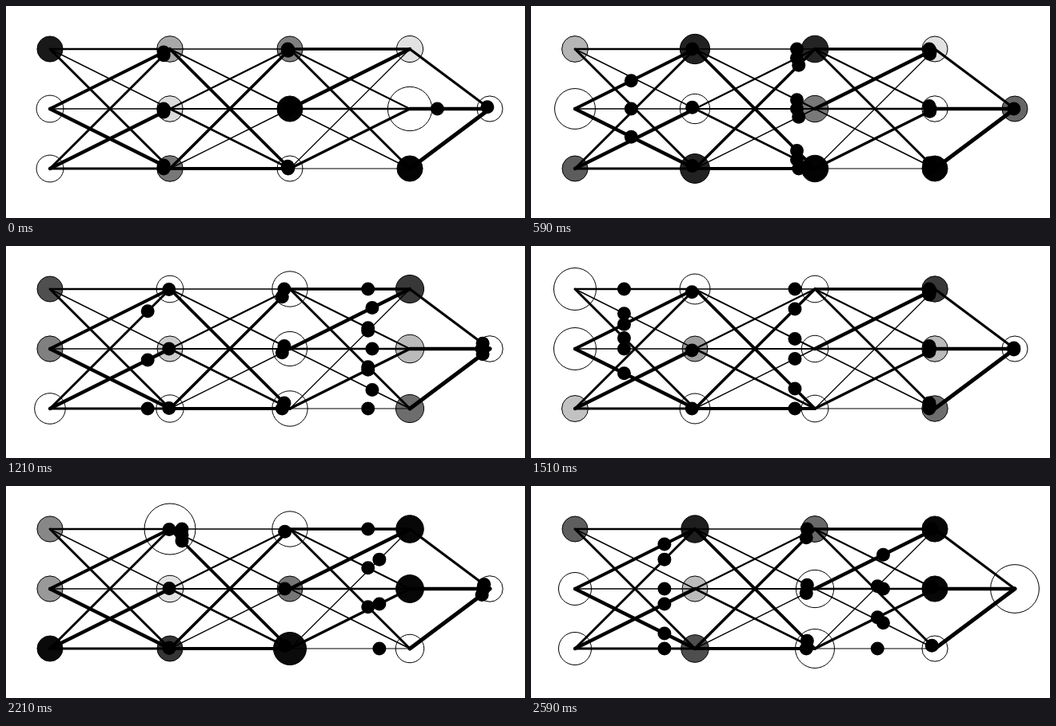
An HTML page that plays this animation: 649 px wide and 266 px high, repeating every 2670 ms.

```html
<!DOCTYPE html>
<html lang="en">
<head>
<meta charset="utf-8">
<title>Firing network</title>
<style>
  html, body { margin: 0; width: 100%; height: 100%; overflow: hidden; background: #fff; }
  svg { display: block; }
</style>
</head>
<body>
<svg id="stage" width="649" height="266" viewBox="0 0 649 266"></svg>
<script>
// A neuron adds up what it receives, grows darker, and fires once its charge
// passes 1. Its pulses carry charge * weight to every neuron of the next layer.
const LOOP = 2670;
const DECAY = 0.9;   // share of a pulse's way, or of a swelling, left after a step
const REST = 52;     // age at which all pulses have arrived

const pace = [
  [0, 0, 0], [360, 5, 23], [900, 12, 58], [1510, 20, 97],
  [1900, 25, 121], [2210, 29, 140], [2590, 34, 165], [LOOP, 35, 170]
];

// Opening state of each layer: charge, steps since firing, charge when it fired.
const layers = [
  [neuron(0.9), neuron(0, 28, 1.057), neuron(0, 28, 1.667)],
  [neuron(0.34, 38, 1.43), neuron(0.137, 40, 1.22), neuron(0.53, 40, 1.32)],
  [neuron(0.5), neuron(0.99), neuron(0)],
  [neuron(0.114, 33, 1.14), neuron(0, 4, 1.1), neuron(0.99)],
  [neuron(0)]
];

// Weights by layer and sender; they also set the line widths.
const weights = [
  [[0.35, 0.11, 0.5], [0.78, 0.1, 0.82], [0.52, 0.85, 0.54]],
  [[0.07, 0.25, 0.69], [0.36, 0.31, 0.4], [0.65, 0.13, 0.75]],
  [[0.65, 0.26, 0.48], [0.82, 0.4, 0.15], [0.07, 0.59, 0.05]],
  [[0.525], [0.875], [1]]
];

// Every 30 steps each neuron of the first layer receives its next input.
const inputs = [
  [0.93, 0.29, 0.4, 0.7, 0.47, 0.16],
  [0.99, 0.79, 0.5, 0.63, 0.4, 0.8],
  [0.17, 0.47, 0.83, 0.24, 0.72, 0.5]
];

function neuron(charge, age = REST, sent = 0) {
  return { charge, age, sent, links: [] };
}

const stage = document.getElementById('stage');

function set(el, attrs) {
  for (const name in attrs) el.setAttribute(name, attrs[name]);
}

function add(tag, attrs) {
  const el = document.createElementNS('http://www.w3.org/2000/svg', tag);
  set(el, attrs);
  stage.append(el);
  return el;
}

layers.forEach((layer, i) => layer.forEach((n, j) => {
  n.x = i < 4 ? 55 + 150 * i : 605;
  n.y = i < 4 ? 54 + 75 * j : 129;
  n.el = add('circle', { cx: n.x, cy: n.y, stroke: '#000' });
}));

const neurons = layers.flat();

weights.forEach((senders, i) => senders.forEach((row, j) => row.forEach((weight, k) => {
  const from = layers[i][j], to = layers[i + 1][k];
  add('line', {
    x1: from.x, y1: from.y, x2: to.x, y2: to.y,
    stroke: '#000', 'stroke-width': 1 + 4 * weight, 'stroke-linecap': 'round'
  });
  from.links.push({ to, weight, length: Math.hypot(to.x - from.x, to.y - from.y) });
})));

for (const n of neurons) {
  for (const link of n.links) link.el = add('circle', { r: 8.5 });
}

// A pulse ends when it is within 1 px of its goal.
const travels = (link, age) => link.length * DECAY ** age >= 1;

function feed(n, value) {
  n.charge += value;
  if (n.charge <= 1) return;
  n.sent = n.charge;
  n.charge = 0;
  n.age = 0;
}

function advance(step) {
  if (step % 30 === 3) {
    layers[0].forEach((n, i) => feed(n, inputs[i][Math.floor(step / 30)]));
  }
  for (const n of neurons) {
    n.age++;
    for (const link of n.links) {
      if (travels(link, n.age - 1) && !travels(link, n.age)) feed(link.to, n.sent * link.weight);
    }
  }
}

const snapshot = () => neurons.map(({ charge, age }) => ({ charge, age }));
const history = [snapshot()];
for (let step = 1; step <= 170; step++) {
  advance(step);
  history.push(snapshot());
}

function draw({ x, y, el, links }, { charge, age }) {
  const grey = Math.round(255 * (1 - charge));
  set(el, { r: 16 + 16 * DECAY ** (age - 1), fill: `rgb(${grey},${grey},${grey})` });
  const left = DECAY ** age;
  for (const link of links) {
    set(link.el, {
      cx: link.to.x + (x - link.to.x) * left,
      cy: link.to.y + (y - link.to.y) * left,
      visibility: travels(link, age) ? 'visible' : 'hidden'
    });
  }
}

// Reads one column of the pace from another, linearly between its points.
function convert(value, from, to) {
  const i = Math.max(1, pace.findIndex(p => p[from] >= value));
  const a = pace[i - 1], b = pace[i];
  return a[to] + (b[to] - a[to]) * (value - a[from]) / (b[from] - a[from]);
}

function stepAt(time) {
  const picture = Math.floor(convert(Math.min(time + 8, LOOP - 1), 0, 1));
  return Math.round(convert(picture, 1, 2));
}

let shown = null;
function render(time) {
  const step = stepAt(time % LOOP);
  if (step === shown) return;
  shown = step;
  neurons.forEach((n, i) => draw(n, history[step][i]));
}

const begin = performance.now();
function tick() {
  render(performance.now() - begin);
  requestAnimationFrame(tick);
}
tick();
</script>
</body>
</html>
```
